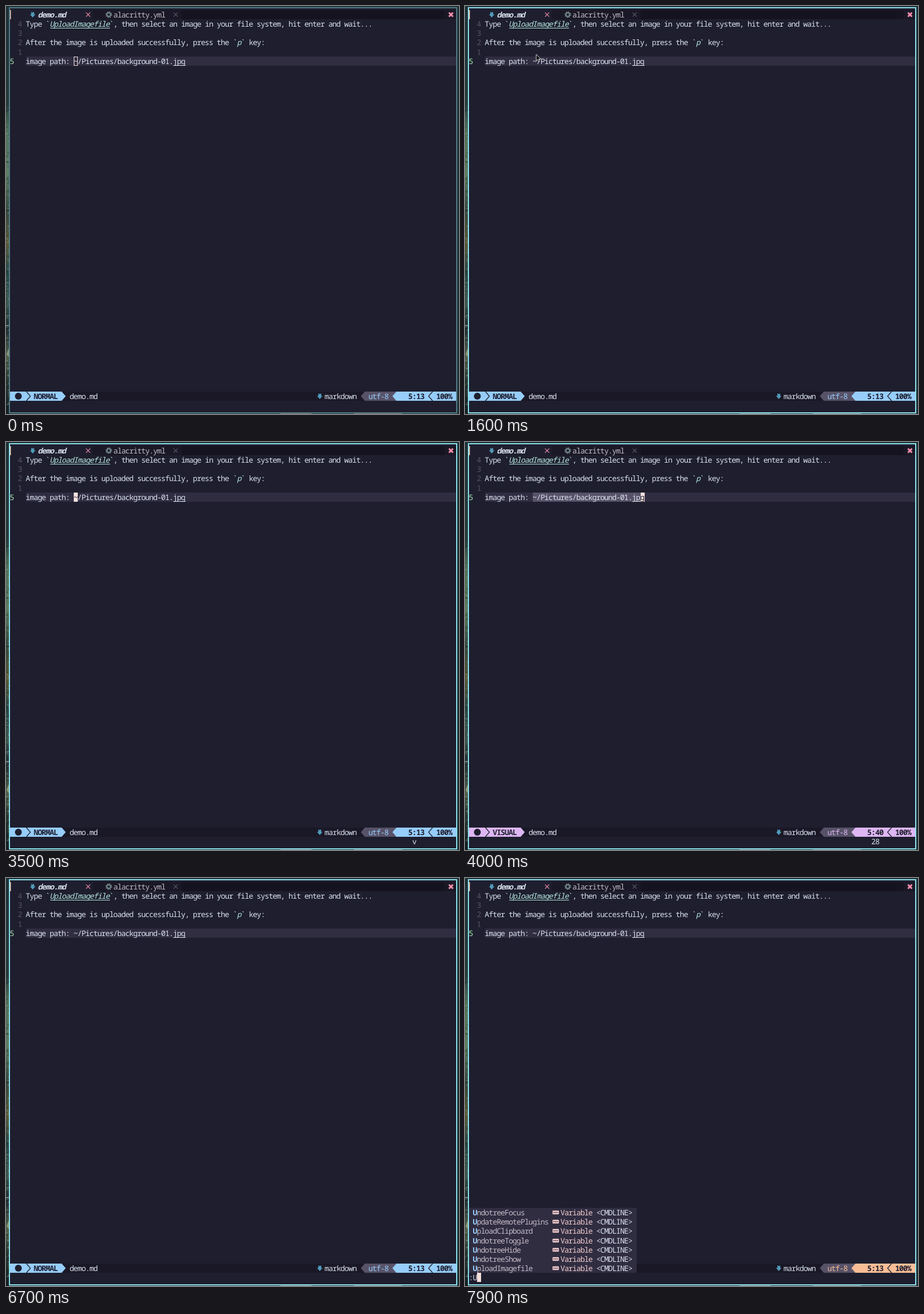
Recreate the animation shown at these times as an HTML page. Size 789x710 px, loop 8000 ms.

```html
<!DOCTYPE html>
<html lang="en">
<head>
<meta charset="utf-8">
<title>Editor session</title>
<style>
  html, body { margin: 0; width: 100%; height: 100%; overflow: hidden; background: #1e1e2e; }
  svg { display: block; width: 789px; height: 710px; }
  text {
    font: 13.2px "Noto Sans Mono", "DejaVu Sans Mono", monospace;
    letter-spacing: -.98px;
    text-rendering: geometricPrecision;
    white-space: pre;
  }
  .bold { font-weight: 700; }
  .italic { font-style: italic; }
</style>
</head>
<body>
<svg id="stage" viewBox="0 0 789 710" xmlns="http://www.w3.org/2000/svg">
  <defs>
    <linearGradient id="wall" x2="0" y2="1">
      <stop offset="0" stop-color="#1d3237"/>
      <stop offset=".24" stop-color="#263b3a"/>
      <stop offset=".3" stop-color="#4f705a"/>
      <stop offset=".42" stop-color="#5d7d62"/>
      <stop offset=".5" stop-color="#33463c"/>
      <stop offset=".58" stop-color="#5b5a38"/>
      <stop offset=".65" stop-color="#274744"/>
      <stop offset=".72" stop-color="#3c5a50"/>
      <stop offset=".79" stop-color="#1d2c2f"/>
      <stop offset=".86" stop-color="#53624e"/>
      <stop offset=".92" stop-color="#26352f"/>
      <stop offset="1" stop-color="#141f22"/>
    </linearGradient>
  </defs>
</svg>
<script>
const LOOP = 8000, CELL = 6.94, ROW = 16.2, LEFT = 7.1, TOP = 6.9;
const C = {
  base: '#1e1e2e', mantle: '#1a1826', crust: '#161320', surface: '#302d41', overlay: '#575268',
  text: '#d9e0ee', rose: '#f5e0dc', teal: '#b5e8e0', red: '#f28fad', green: '#abe9b3',
  blue: '#96cdfb', peach: '#f8bd96', mauve: '#ddb6f2', pink: '#f2cdcd', soft: '#c3bac6', icon: '#519aba'
};
const stage = document.getElementById('stage');
const colX = col => Math.round(LEFT + col * CELL);
const rowY = row => Math.round(TOP + row * ROW);
const textX = col => LEFT + col * CELL - .5;
const textY = row => rowY(row) + 12.7;

function set(el, attrs) {
  for (const key in attrs) el.setAttribute(key, attrs[key]);
  return el;
}
function add(tag, attrs, parent = stage) {
  return parent.appendChild(set(document.createElementNS('http://www.w3.org/2000/svg', tag), attrs));
}
const show = (el, on) => el.setAttribute('visibility', on ? 'visible' : 'hidden');
const box = (x, y, width, height, fill, parent) => add('rect', { x, y, width, height, fill }, parent);
const path = (d, attrs, parent) => add('path', { d, ...attrs }, parent);

// Cell edges snap to whole pixels, as in a terminal.
function cells(col, row, n, fill, parent) {
  return box(colX(col), rowY(row), colX(col + n) - colX(col), rowY(row + 1) - rowY(row), fill, parent);
}
function label(col, row, str, fill, style = '', parent = stage) {
  const el = add('text', { x: textX(col), y: textY(row), fill, class: style }, parent);
  el.textContent = str;
  return el;
}
function underline(col, row, n, fill) {
  box(colX(col), rowY(row) + 15, n * CELL, 1, fill);
}
function cross(x, y, r, stroke, width) {
  path(`M${x - r} ${y - r}l${2 * r} ${2 * r}m0 ${-2 * r}l${-2 * r} ${2 * r}`, { stroke, 'stroke-width': width });
}
function downArrow(x, y) {
  path(`M${x - 2.5} ${y - 5}l2.5 1.6l2.5 -1.6v4.6h2.3l-4.8 5.3l-4.8 -5.3h2.3z`, { fill: C.icon });
}

let seed = 7;
const random = () => (seed = seed * 16807 % 2147483647) / 2147483647;

// Wallpaper strips and window
box(0, 0, 789, 710, '#1d3034');
box(0, 0, 6, 710, 'url(#wall)');
for (let i = 0; i < 150; i++) {
  const fleck = box(random() * 4, 180 + random() * 520, 1 + random() * 4, 1 + random() * 2,
    random() < .5 ? '#131f20' : '#8ba283');
  set(fleck, { opacity: .35 });
}
box(0, 555.5, 6, 1.2, '#b4bdb9');
path('M1 606l4 -11v16z', { fill: '#8d9a78' });
for (const [x, width] of [[478, 54], [606, 84]]) box(x, 708.5, width, 1.5, '#77706f');
const frame = add('rect', { x: 6, y: 3, width: 779, height: 705, fill: C.base, 'stroke-width': 2 });

// Tab line
cells(20.7, 0, 22.3, C.mantle);
cells(43, 0, 66, C.crust);
cells(109, 0, 3, C.mantle);
box(7, 7, 1.5, 16, '#f5c9b0');
downArrow(46.5, 15);
label(7, 0, 'demo.md', C.text, 'bold italic');
cross(143, 15, 3.6, C.red, 1.2);
add('circle', { cx: 179, cy: 15, r: 3.3, fill: 'none', stroke: '#6d8086', 'stroke-width': 2.4 });
add('circle', { cx: 179, cy: 15, r: 4.9, fill: 'none', stroke: '#6d8086', 'stroke-width': 1.7, 'stroke-dasharray': '1.92 1.93' });
label(26, 0, 'alacritty.yml', C.soft);
cross(295.5, 15, 3.5, C.overlay, 1.1);
cross(775, 15, 3.5, C.red, 3);

// Buffer
cells(4, 5, 108, C.surface);
const selection = cells(16, 5, 1, C.overlay);
[4, 3, 2, 1].forEach((n, i) => label(2, i + 1, n, C.overlay));
label(0, 5, '5', C.green);
label(4, 1, 'Type', C.text);
label(9, 1, '`', C.teal);
label(10, 1, 'UploadImagefile', C.teal, 'italic');
underline(10, 1, 15, C.teal);
label(25, 1, '`', C.teal);
label(26, 1, ', then select an image in your file system, hit enter and wait...', C.text);
label(4, 3, 'After the image is uploaded successfully, press the', C.text);
label(56, 3, '`', C.teal);
label(57, 3, 'p', C.teal, 'italic');
label(58, 3, '`', C.teal);
label(60, 3, 'key:', C.text);
label(4, 5, 'image path: ~/Pictures/background-01.jpg', C.text);
underline(41, 5, 3, C.text);

// Status line
cells(0, 41, 112, C.mantle);
const top41 = rowY(41), end41 = rowY(42), mid41 = (top41 + end41) / 2;
const modeBlock = path('', {});
add('circle', { cx: 21.5, cy: mid41, r: 6, fill: C.base });
path(`M35.5 ${top41}L42.5 ${mid41}L35.5 ${end41}`, { fill: 'none', stroke: C.base, 'stroke-width': 1.3 });
const modeName = label(6, 41, '', C.base, 'bold');
const fileName = label(15, 41, 'demo.md', C.text);
downArrow(546.5, mid41);
label(79, 41, 'markdown', C.text);
path(`M${colX(88)} ${mid41}L${colX(89)} ${top41}H690V${end41}H${colX(89)}z`, { fill: C.overlay });
const encoding = label(90, 41, 'utf-8', C.blue);
const rightBlock = path(`M${colX(96)} ${mid41}L${colX(97)} ${top41}H784V${end41}H${colX(97)}z`, {});
const position = label(100, 41, '', C.base, 'bold');
path(`M743 ${top41}L736 ${mid41}L743 ${end41}`, { fill: 'none', stroke: C.base, 'stroke-width': 1.3 });
label(107, 41, '100%', C.base, 'bold');

// Command line and completion menu
const command = label(0, 42, '', C.text);
const pending = label(101, 42, '', C.text);
const menu = add('g', {});
['UndotreeFocus', 'UpdateRemotePlugins', 'UploadClipboard', 'UndotreeToggle',
 'UndotreeHide', 'UndotreeShow', 'UploadImagefile'].forEach((name, i) => {
  const row = 35 + i, y = rowY(row) + 8;
  cells(0, row, 42, C.surface, menu);
  label(1, row, name[0], C.blue, 'bold', menu);
  label(2, row, name.slice(1), C.soft, '', menu);
  add('rect', { x: 152.5, y: y - 3.2, width: 11, height: 6.4, rx: 1, fill: C.pink }, menu);
  for (const dx of [2, 4.8, 7.6]) box(152.2 + dx, y - .8, 1.7, 1.7, C.surface, menu);
  label(23, row, 'Variable', C.pink, '', menu);
  label(32, row, '<CMDLINE>', C.text, '', menu);
});

// Text cursor and pointer
const cursor = add('g', {});
const cursorBox = add('rect', { width: 6, height: 15, stroke: C.rose }, cursor);
const cursorChar = label(0, 0, '', C.base, '', cursor);
const pointer = path('M0 0V11.5L2.7 9L4.6 13L6.3 12.2L4.5 8.4H8z',
  { fill: '#111', stroke: '#e8e8e8', 'stroke-width': .9 });

function placeCursor(col, row, char, hollow) {
  set(cursorBox, { x: colX(col) + .5, y: rowY(row) + .5, fill: hollow ? 'none' : C.rose });
  set(cursorChar, { x: textX(col), y: textY(row) });
  cursorChar.textContent = hollow ? '' : char;
}

const MODES = { NORMAL: C.blue, VISUAL: C.mauve, COMMAND: C.peach };
const HIDDEN_CURSOR = [[1500, 2300], [3000, 3400], [3600, 4000], [5100, 5800], [6700, 7000], [7800, 7900]];
const during = (t, a, b) => t >= a && t < b;
const clamp = v => Math.max(0, Math.min(1, v));
const lerp = (a, b, k) => a + (b - a) * k;
const mix = (a, b, k) => `rgb(${a.map((v, i) => Math.round(lerp(v, b[i], k)))})`;

function drawMode(t, mode) {
  const color = MODES[mode], end = colX(7 + mode.length), tip = colX(8 + mode.length);
  set(modeBlock, { d: `M7 ${top41}H${end}L${tip} ${mid41}L${end} ${end41}H7z`, fill: color });
  set(rightBlock, { fill: color });
  set(encoding, { fill: color });
  set(fileName, { x: textX(9 + mode.length) });
  modeName.textContent = mode;
  position.textContent = during(t, 4000, 4300) ? '5:40' : '5:13';
}

function drawPointer(t) {
  show(pointer, during(t, 700, 2300));
  const enter = 1 - (1 - clamp((t - 700) / 900)) ** 2;
  const drift = clamp((t - 1600) / 600);
  const x = t < 1600 ? lerp(1, 124, enter) : lerp(124, 116, drift);
  const y = t < 1600 ? lerp(698, 84, enter) : lerp(84, 95, drift);
  set(pointer, { transform: `translate(${x} ${y})` });
}

function render(time) {
  const t = Math.floor(time % LOOP / 100) * 100;
  const focus = 1 - (1 - clamp((t - 600) / 900)) ** 2;
  set(frame, { stroke: mix([82, 122, 134], [139, 224, 236], focus) });

  const visual = during(t, 3600, 4300), extended = during(t, 4000, 4300);
  drawMode(t, t >= 7000 ? 'COMMAND' : visual ? 'VISUAL' : 'NORMAL');
  show(selection, visual);
  set(selection, { width: colX(extended ? 44 : 17) - colX(16) });
  pending.textContent = during(t, 3500, 3600) ? 'v' : extended ? '28' : visual ? '1' : '';

  command.textContent = t >= 7900 ? ':U' : t >= 7000 ? ':' : '';
  show(menu, t >= 7900);

  show(cursor, !HIDDEN_CURSOR.some(([a, b]) => during(t, a, b)));
  if (t >= 7000) placeCursor(t >= 7900 ? 2 : 1, 42, '');
  else if (extended) placeCursor(43, 5, 'g');
  else placeCursor(16, 5, '~', t < 700);

  drawPointer(t);
}

const start = performance.now();
(function tick() {
  render(performance.now() - start);
  requestAnimationFrame(tick);
})();
</script>
</body>
</html>
```
